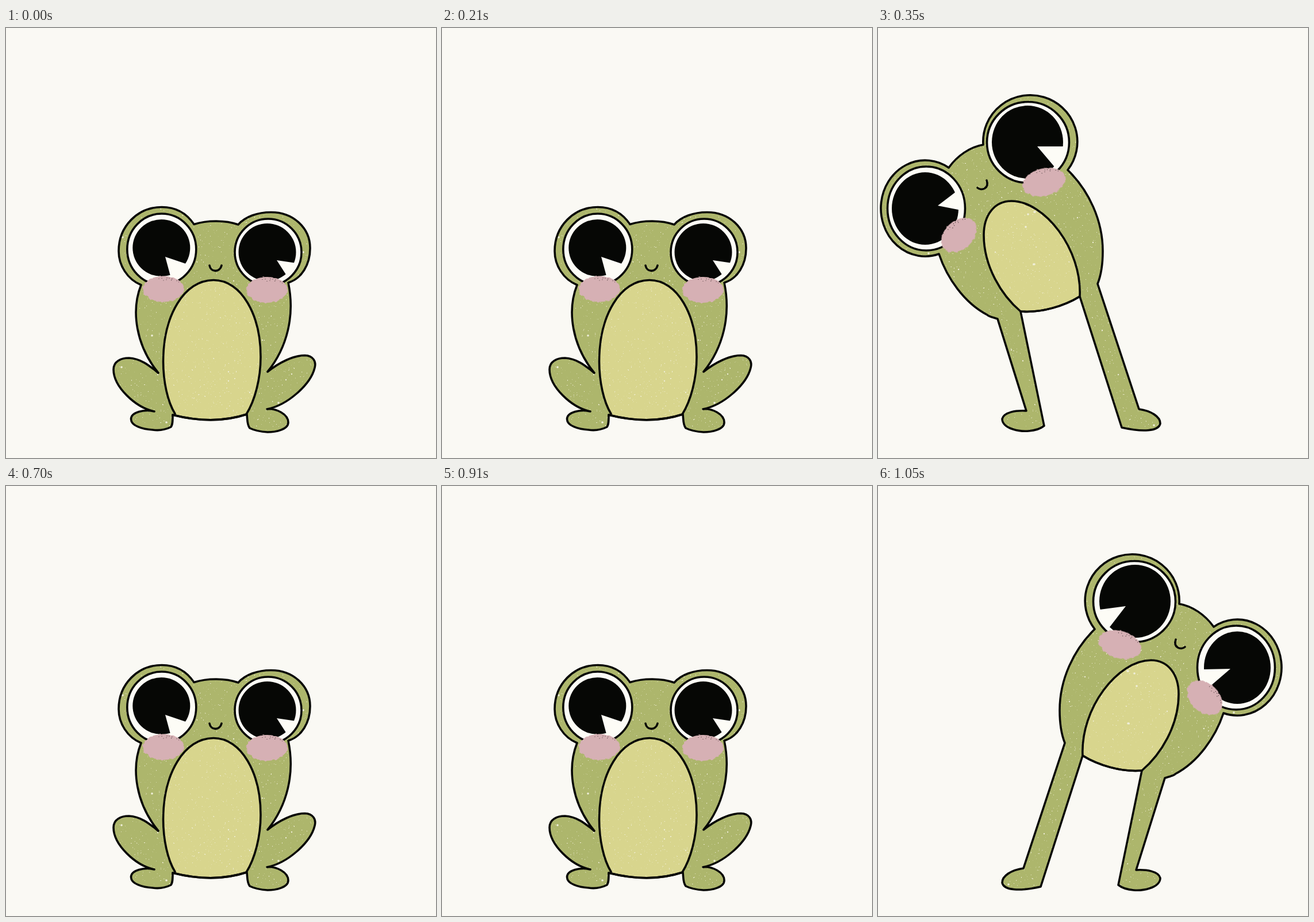
Recreate the animation shown at these times as an HTML page without scripts. Size 748 by 748 pixels, loop 1400 ms.

```html
<!DOCTYPE html>
<html lang="en">
<head>
<meta charset="utf-8">
<title>Dancing frog</title>
<style>
  html, body { margin: 0; width: 100%; height: 100%; overflow: hidden; background: #faf9f4; }
  svg { display: block; width: 100%; height: 100%; }

  .skin { fill: #adb66c; }
  .belly { fill: #d8d58d; }
  .skin, .belly { filter: url(#speckle); }
  .line { fill: none; }
  .line, .ring { stroke: #060705; stroke-width: 3.6; stroke-linejoin: round; stroke-linecap: round; }
  .ring, .glint { fill: #fdfcf6; }
  .pupil { fill: #060705; }
  .spots { fill: none; stroke: #f0efda; stroke-width: 3.6; stroke-linecap: round; }
  .small { stroke-width: 2.3; }
  .blush { fill: #d6b0b4; filter: url(#rough); }
  .grain { fill: none; stroke: #3d2f30; stroke-width: 1.2; stroke-linecap: round; stroke-dasharray: 0 5 0 9 0 4; }

  .sit, .left, .right { animation: 1.4s step-end infinite; }
  .sit { animation-name: sit; }
  .left { animation-name: left; }
  .right { animation-name: right; }
  @keyframes sit {
    0%, 50% { visibility: visible; }
    25%, 75%, 100% { visibility: hidden; }
  }
  @keyframes left {
    0%, 50%, 100% { visibility: hidden; }
    25% { visibility: visible; }
  }
  @keyframes right {
    0%, 100% { visibility: hidden; }
    75% { visibility: visible; }
  }
</style>
</head>
<body>
<svg viewBox="0 0 748 748">
  <defs>
    <!-- pale paint flecks, kept inside the shape -->
    <filter id="speckle" color-interpolation-filters="sRGB">
      <feTurbulence type="fractalNoise" baseFrequency=".35" numOctaves="2" seed="8"/>
      <feColorMatrix values="0 0 0 0 .95  0 0 0 0 .94  0 0 0 0 .85  0 0 0 12 -8.75"/>
      <feComposite in2="SourceAlpha" operator="in" result="flecks"/>
      <feMerge><feMergeNode in="SourceGraphic"/><feMergeNode in="flecks"/></feMerge>
    </filter>
    <filter id="rough" color-interpolation-filters="sRGB">
      <feTurbulence type="fractalNoise" baseFrequency=".2" numOctaves="2" seed="3" result="noise"/>
      <feDisplacementMap in="SourceGraphic" in2="noise" scale="4" xChannelSelector="R" yChannelSelector="G"/>
    </filter>

    <path id="sitBody" d="M327 341.500C350 334 382 334 404 342C416 328 438 320.500 461 320.500C500 320.500 529 348 529 383
      C529 412 514 436 491 443C503 500 489 556 455 598C475 582 500 569.500 520 569.500C534 570 540 580 537 591
      C530 620 490 656 454 663C470 661 491 672 491 686C491 699 468 703 455 703C440 702 432 700 424 696
      C419 690 420 680 419 672Q361 691 290 673C290 682 290 690 287 694C275 700 262 700 255 699
      C238 698 217 692 217.500 680C218 668 240 663 258 667C225 660 187 624 187 594C187 580 200 574 214 574
      C235 575 250 588 265 600C226 552 217 492 235 447C211 437 196 413 196 388
      C196 345 229 311.500 271 311.500C295 311.500 314 322 327 341.500Z"/>
    <path id="sitBelly" d="M294 671C281 650 273.500 615 273.500 580C273.500 500 310 438.500 361 438.500
      C410 438.500 443 500 443 572C443 610 433 648 418 672Q361 691 290 673"/>

    <path id="leanBody" d="M123 243C138 222 160 207 183 203A82 81 0 1 1 330 247C367 283 391 335 391 388
      C391 410 388 430 382 445L454 663C475 666 491 676 491 688C488 702 460 703 424 695L351 467
      C325 483 285 496 248 493L289 692C275 703 250 703 235 698C222 694 216 687 216 680
      C219 668 240 665 258 666L208 506C203 504 192 502 190 499C150 478 120 435 106 393
      A77 83.500 0 1 1 123 243Z"/>
    <path id="leanBelly" d="M248 493C215 465 184 415 184 360C184 325 203 301 232 301
      C290 301 355 385 351 467C325 483 285 496 248 493Z"/>

    <g id="cheek">
      <ellipse class="blush" rx="36" ry="22.500"/>
      <path class="grain" d="M-8 -18Q12 -22 27 -12M0 -15Q9 -18 17 -14"/>
    </g>

    <g id="lean">
      <use href="#leanBody" class="skin"/>
      <use href="#leanBelly" class="belly"/>
      <path class="spots" d="M271 411h1M261 324h0M272 320h1M257 346h0M88 392h0M480 691h0"/>
      <path class="spots small" d="M252 579h0M390 526h0M374 373h0M204 390h0M140 420h0M232 560h0M418 603h0M347 330h0"/>
      <use href="#leanBody" class="line"/>
      <use href="#leanBelly" class="line"/>
      <path class="line" d="M173 278C180 284 194 279 189 265"/>
      <ellipse class="ring" cx="84" cy="314" rx="67.500" ry="73"/>
      <ellipse class="pupil" cx="82" cy="314" rx="58" ry="63"/>
      <ellipse class="ring" cx="261" cy="199" rx="71.500" ry="70.500"/>
      <ellipse class="pupil" cx="260" cy="198.500" rx="62" ry="63.500"/>
    </g>
  </defs>

  <rect width="748" height="748" fill="#faf9f4"/>

  <g class="sit">
    <use href="#sitBody" class="skin"/>
    <use href="#sitBelly" class="belly"/>
    <path class="spots" d="M201 590h0M254 535h0M203 364h0M474 652h0M517 390h0M279 686h0"/>
    <path class="spots small" d="M387 614h0M446 543h0M487 612h0M424 634h0M387 598h0M396 440h0M264 603h0M497 602h0"/>
    <use href="#sitBody" class="line"/>
    <use href="#sitBelly" class="line"/>
    <path class="line" d="M354 413C356 425 372 426 375 413"/>
    <ellipse class="ring" cx="270.800" cy="385" rx="60" ry="62"/>
    <ellipse class="pupil" cx="270.300" cy="382.500" rx="50" ry="49.500"/>
    <path class="glint" d="M277 398L317 411.500L306 430L287 435Z"/>
    <circle class="ring" cx="456" cy="390" r="58"/>
    <circle class="pupil" cx="454.500" cy="390" r="50"/>
    <path class="glint" d="M471 404L505 409L500 419L489 432Z"/>
    <use href="#cheek" x="274" y="454"/>
    <use href="#cheek" x="454" y="455.500"/>
  </g>

  <g class="left">
    <use href="#lean"/>
    <path class="glint" d="M104 309L138 283L145 300L142 316.500Z"/>
    <path class="glint" d="M277 206L325 206L322 226L310 245Z"/>
    <use href="#cheek" transform="translate(141 360) rotate(-42) scale(.98 1.100)"/>
    <use href="#cheek" transform="translate(289 268) rotate(-14) scale(1.060)"/>
  </g>

  <g class="right">
    <use href="#lean" transform="translate(707 2) scale(-1 1)"/>
    <path class="glint" d="M431 209L382 215.500L389 236L401 248Z"/>
    <path class="glint" d="M613 318L564 319L567 340L577 349Z"/>
    <use href="#cheek" transform="translate(421 276) rotate(17) scale(1.060)"/>
    <use href="#cheek" transform="translate(568.500 368.500) rotate(44) scale(.98 1.100)"/>
  </g>
</svg>
</body>
</html>
```
